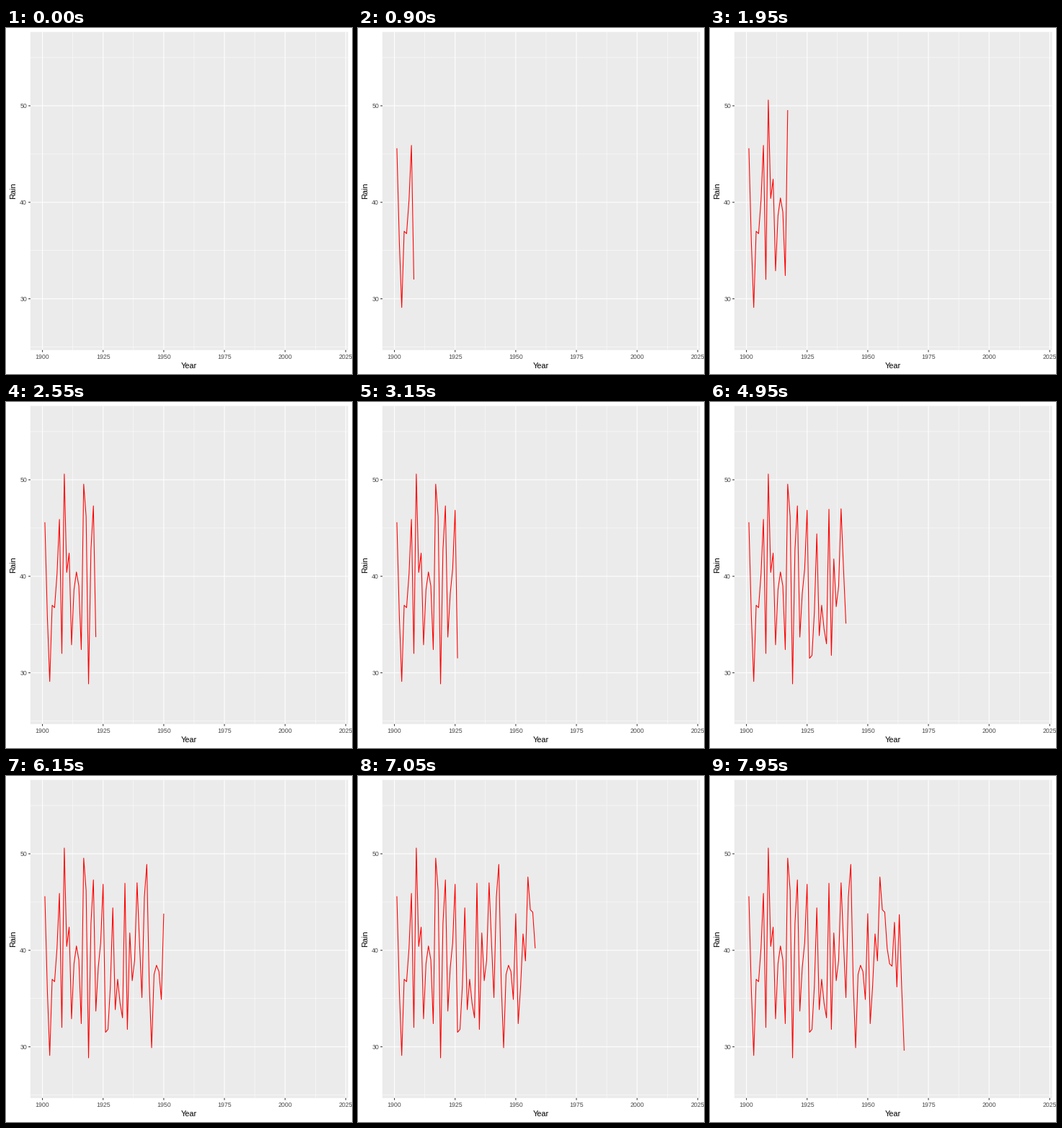
Write a matplotlib script that moves like this. It is 480 by 480 pixels and loops after 8000 ms.

```python
import numpy as np
import matplotlib.pyplot as plt
from matplotlib.animation import FuncAnimation
from matplotlib.patches import Rectangle

SIZE, DPI = 480, 72            # at 72 dpi one point equals one pixel
INTERVAL, LOOP = 50, 8000
STEP_MS = 150
LEFT, RIGHT, TOP, BOTTOM = 33.9, 474.52, 5.48, 446.8
FIRST_YEAR, LAST_YEAR, STEPS = 1901, 2020, 100

RAIN = np.array([
    45.6, 36.0, 29.1, 37.0, 36.75, 40.2, 45.9, 32.0, 50.6, 40.4,
    42.4, 32.9, 38.6, 40.45, 39.0, 32.4, 49.55, 46.2, 28.85, 42.8,
    47.3, 33.7, 38.2, 40.8, 46.85, 31.5, 31.8, 36.3, 44.4, 33.85,
    37.0, 34.5, 33.0, 46.95, 31.8, 41.8, 36.85, 39.0, 47.0, 40.8,
    35.1, 45.5, 48.9, 36.7, 29.9, 37.5, 38.45, 37.8, 34.9, 43.8,
    32.4, 36.3, 41.7, 38.9, 47.6, 44.2, 43.95, 40.2, 38.6, 38.35,
    42.9, 36.2, 43.7, 36.0, 29.6])
YEARS = FIRST_YEAR + np.arange(len(RAIN))

# Step at which each year is revealed
REVEAL = np.round((YEARS - FIRST_YEAR) * (STEPS - 1) / (LAST_YEAR - FIRST_YEAR))


def px(year):
    pad = 0.05 * (LAST_YEAR - FIRST_YEAR)
    span = LAST_YEAR - FIRST_YEAR + 2 * pad
    return LEFT + (year - FIRST_YEAR + pad) * (RIGHT - LEFT) / span


def py(rain):
    return 241.8 - (rain - 40) * 13.387


plt.rcParams["font.family"] = "Liberation Sans"
fig = plt.figure(figsize=(SIZE / DPI, SIZE / DPI), dpi=DPI, facecolor="white")
ax = fig.add_axes([0, 0, 1, 1])
ax.set(xlim=(0, SIZE), ylim=(SIZE, 0))
ax.axis("off")


def segment(xs, ys, color, width, z):
    ax.plot(xs, ys, color=color, lw=width, zorder=z, snap=False,
            solid_capstyle="butt")


def label(x, y, text, size, color, ha="center", **kw):
    ax.text(x, y, text, fontsize=size, color=color, ha=ha, va="baseline", **kw)


def grid(years, rains, width, z):
    for rain in rains:
        segment([LEFT, RIGHT], [py(rain)] * 2, "white", width, z)
    for year in years:
        segment([px(year)] * 2, [TOP, BOTTOM], "white", width, z)


ax.add_patch(Rectangle((LEFT, TOP), RIGHT - LEFT, BOTTOM - TOP,
                       fc="#EBEBEB", ec="none", snap=False, zorder=0))
major_years, major_rain = range(1900, 2026, 25), (30, 40, 50)
grid(np.arange(1912.5, 2025, 25), (25, 35, 45, 55), 0.53, 1)
grid(major_years, major_rain, 1.07, 2)

for year in major_years:
    segment([px(year)] * 2, [BOTTOM, BOTTOM + 2.75], "#333333", 1.07, 4)
    label(px(year), 459, str(year), 8.8, "#4D4D4D")
for rain in major_rain:
    segment([LEFT - 2.75, LEFT], [py(rain)] * 2, "#333333", 1.07, 4)
    label(29, py(rain) + 3.2, str(rain), 8.8, "#4D4D4D", ha="right")

label((LEFT + RIGHT) / 2, 472.1, "Year", 11, "black")
ax.text(13.3, (TOP + BOTTOM) / 2, "Rain", fontsize=11, color="black",
        rotation=90, rotation_mode="anchor", ha="center", va="baseline")

line, = ax.plot([], [], color="red", lw=1.07, zorder=3, snap=False,
                solid_capstyle="butt", solid_joinstyle="round")


def update(frame):
    step = frame * INTERVAL // STEP_MS
    shown = REVEAL <= step
    line.set_data(px(YEARS[shown]), py(RAIN[shown]))
    return line,


anim = FuncAnimation(fig, update, frames=LOOP // INTERVAL, interval=INTERVAL,
                     repeat=True, repeat_delay=0)
plt.show()
```
